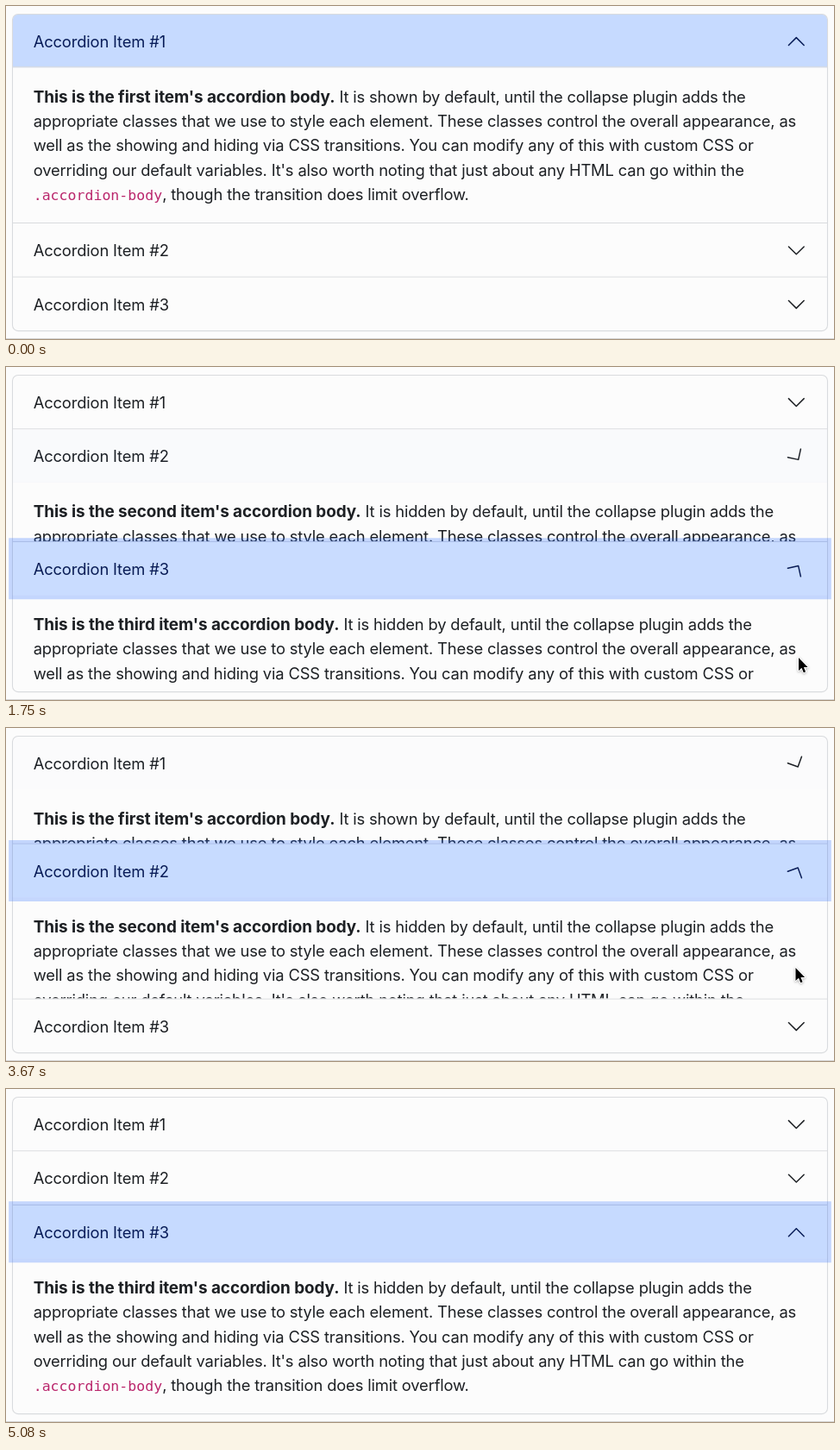
An HTML page with a canvas for the animation above (5330 ms loop, 960 by 386 pixels).

```html
<!DOCTYPE html>
<html lang="en">
<head>
<meta charset="utf-8">
<title>Accordion</title>
<style>
  html, body { margin: 0; width: 100%; height: 100%; overflow: hidden; background: #fcfcfc; }
  canvas { display: block; width: 960px; height: 386px; }
</style>
</head>
<body>
<canvas id="stage"></canvas>
<script>
const W = 960, H = 386, LOOP = 5330;
const canvas = document.getElementById('stage');
const ctx = canvas.getContext('2d');
const dpr = window.devicePixelRatio || 1;
canvas.width = W * dpr;
canvas.height = H * dpr;

// Layout
const LEFT = 7.9, RIGHT = 952.1, TOP = 9.8;
const BUTTON = 61.5, BORDER = 1.1, BODY = 179.7;
const PAD_X = 31.7, LINE = 28.4, BASE = 7.2, RING = 4.7, RADIUS = 5.9;

// Colours
const PAGE = [252, 252, 252], ACTIVE = [198, 218, 255];
const INK = [29, 32, 36], NAVY = [8, 28, 88];
const EDGE = '#d9dbde', CODE = '#ba266c', FOCUS = 'rgba(30,100,255,.25)';
const rgb = c => `rgb(${c.join(',')})`;
const mix = (a, b, k) => rgb(a.map((v, i) => v + (b[i] - v) * k));

// Type
const REGULAR = { font: '400 18.36px Inter, "Liberation Sans", sans-serif', gap: '-0.16px' };
const BOLD = { font: '700 18.93px Inter, "Liberation Sans", sans-serif', gap: '-0.08px' };
const MONO = { font: '16.56px "DejaVu Sans Mono", monospace', gap: '0px' };

const ITEMS = [['first', 'shown'], ['second', 'hidden'], ['third', 'hidden']];
const COPY = [
  'appropriate classes that we use to style each element. These classes control the overall appearance, as',
  'well as the showing and hiding via CSS transitions. You can modify any of this with custom CSS or',
  "overriding our default variables. It's also worth noting that just about any HTML can go within the"
];

// [time, item opened]
const CLICKS = [[-9999, 0], [710, 1], [1625, 2], [2640, 0], [3538, 1], [4313, 2]];
const SLIDE = 350, TURN = 200, FADE = 150, LEAD = 15;

// [time, x, y] of the pointer tip
const PATH = [
  [200, 931, 215], [520, 913, 280], [1100, 913, 280], [1300, 919, 337],
  [1800, 919, 337], [2330, 911, 45], [2500, 911, 38], [2690, 911, 38],
  [3000, 915.5, 163], [3250, 915.5, 278], [3800, 915.5, 278], [4200, 915, 354], [4520, 915, 354]
];

const ARROW = new Path2D('M0 0V15L3.5 11.8L5.8 17.2L8.1 16.2L5.9 10.9H10.6Z');
const HAND = new Path2D('M-2.2 12.5V2a2 2 0 0 1 4 0v6.2c0-2.2 3.6-2 3.6.3 .3-1.8 3.5-1.5 3.5.6 ' +
  '.4-1.5 2.8-1.1 2.8.9v4.5c0 1.6-1.3 2.6-1.3 4.5v2H-.6v-1.6c-1.6-2-3.6-4-5-6.6-1.6-2.4 1.2-3.8 2.5-1.9z');
const KNUCKLES = new Path2D('M2.6 13.2v4.3M5.3 13.2v4.3M8 13.2v4.3');
const CHEVRON = new Path2D('M-6-3L0 3L6-3');

function bezier(x1, y1, x2, y2) {
  const at = (a, b, u) => 3 * (1 - u) * (1 - u) * u * a + 3 * (1 - u) * u * u * b + u * u * u;
  return x => {
    if (x <= 0) return 0;
    if (x >= 1) return 1;
    let lo = 0, hi = 1;
    for (let i = 0; i < 24; i++) {
      const mid = (lo + hi) / 2;
      if (at(x1, x2, mid) < x) lo = mid; else hi = mid;
    }
    return at(y1, y2, lo);
  };
}
const ease = bezier(.25, .1, .25, 1);
const easeInOut = bezier(.42, 0, .58, 1);

function write(text, x, y, style, color) {
  ctx.font = style.font;
  ctx.letterSpacing = style.gap;
  ctx.fillStyle = color;
  ctx.fillText(text, x, y);
  return x + ctx.measureText(text).width;
}

function fillBox(y, h, r, color) {
  ctx.beginPath();
  ctx.roundRect(LEFT, y, RIGHT - LEFT, h, r);
  ctx.fillStyle = color;
  ctx.fill();
}

function drawBody(i, top, height) {
  if (height < .1) return;
  const ink = rgb(INK);
  const [name, state] = ITEMS[i];
  ctx.save();
  ctx.beginPath();
  ctx.rect(LEFT, top, RIGHT - LEFT, height);
  ctx.clip();
  let y = top + 18.93 + LINE / 2 + BASE;
  const x = write(`This is the ${name} item's accordion body.`, PAD_X, y, BOLD, ink);
  write(` It is ${state} by default, until the collapse plugin adds the`, x, y, REGULAR, ink);
  for (const line of COPY) write(line, PAD_X, y += LINE, REGULAR, ink);
  y += LINE;
  const end = write('.accordion-body', PAD_X, y, MONO, CODE);
  write(', though the transition does limit overflow.', end, y, REGULAR, ink);
  ctx.restore();
}

function drawChevron(y, turn, color) {
  ctx.save();
  ctx.translate(916.3, y);
  ctx.rotate(-Math.PI * turn);
  ctx.scale(1.48, 1.48);
  ctx.lineWidth = 1;
  ctx.lineCap = ctx.lineJoin = 'round';
  ctx.strokeStyle = color;
  ctx.stroke(CHEVRON);
  ctx.restore();
}

function drawRing(y, first) {
  const corners = r => first ? [r, r, 0, 0] : 0;
  ctx.beginPath();
  ctx.roundRect(LEFT - RING, y - RING, RIGHT - LEFT + 2 * RING, BUTTON + 2 * RING, corners(RADIUS + RING));
  ctx.roundRect(LEFT, y, RIGHT - LEFT, BUTTON, corners(RADIUS));
  ctx.fillStyle = FOCUS;
  ctx.fill('evenodd');
}

function pointerAt(t) {
  const k = PATH.findIndex(p => p[0] > t);
  if (k < 1) return null;
  const [t0, x0, y0] = PATH[k - 1], [t1, x1, y1] = PATH[k];
  const u = easeInOut((t - t0) / (t1 - t0));
  return [x0 + (x1 - x0) * u, y0 + (y1 - y0) * u];
}

function drawPointer(t, tops, settled) {
  const p = pointerAt(t);
  if (!p) return;
  const hand = settled && tops.some(y => p[1] > y && p[1] < y + BUTTON);
  ctx.save();
  ctx.translate(p[0], p[1]);
  ctx.lineJoin = 'round';
  if (hand) {
    ctx.fillStyle = '#fff';
    ctx.strokeStyle = '#111';
    ctx.lineWidth = 1.3;
    ctx.fill(HAND);
    ctx.stroke(HAND);
    ctx.lineWidth = 1.1;
    ctx.stroke(KNUCKLES);
  } else {
    ctx.shadowColor = 'rgba(0,0,0,.3)';
    ctx.shadowBlur = 3 * dpr;
    ctx.shadowOffsetY = dpr;
    ctx.strokeStyle = '#fff';
    ctx.lineWidth = 2;
    ctx.stroke(ARROW);
    ctx.shadowColor = 'transparent';
    ctx.fillStyle = '#000';
    ctx.fill(ARROW);
  }
  ctx.restore();
}

function draw(t) {
  const k = CLICKS.filter(c => c[0] <= t).length - 1;
  const [start, current] = CLICKS[k];
  const previous = k ? CLICKS[k - 1][1] : -1;
  const age = t - start;
  const level = (i, v) => i === current ? v : i === previous ? 1 - v : 0;
  const slide = ease(age / SLIDE);
  const turn = easeInOut((age + LEAD) / TURN);
  const fade = easeInOut(age / FADE);

  ctx.setTransform(dpr, 0, 0, dpr, 0, 0);
  ctx.fillStyle = rgb(PAGE);
  ctx.fillRect(0, 0, W, H);
  ctx.fillStyle = '#d6d6d6';
  ctx.fillRect(0, 385, W, 1);

  const tops = [];
  let y = TOP;
  for (let i = 0; i < 3; i++) {
    const lit = level(i, fade), open = level(i, slide) * BODY;
    const mid = y + BUTTON / 2, color = mix(INK, NAVY, lit);
    const bottom = y + BUTTON + open;
    tops.push(y);
    fillBox(y, BUTTON, i ? 0 : [RADIUS, RADIUS, 0, 0], mix(PAGE, ACTIVE, lit));
    if (lit > 0 && !(k && i === current)) {
      ctx.globalAlpha = lit;
      ctx.fillStyle = EDGE;
      ctx.fillRect(LEFT, y + BUTTON - BORDER, RIGHT - LEFT, BORDER);
      ctx.globalAlpha = 1;
    }
    write(`Accordion Item #${i + 1}`, PAD_X, mid + BASE, REGULAR, color);
    drawChevron(mid + .5, level(i, turn), color);
    drawBody(i, y + BUTTON, open);
    if (i < 2) {
      ctx.fillStyle = EDGE;
      ctx.fillRect(LEFT, bottom, RIGHT - LEFT, BORDER);
    }
    y = bottom + BORDER;
  }

  ctx.beginPath();
  ctx.roundRect(7.5, TOP - .3, 945, y - TOP - .4, 6.5);
  ctx.strokeStyle = EDGE;
  ctx.lineWidth = BORDER;
  ctx.stroke();

  if (k) drawRing(tops[current], current === 0);
  drawPointer(t, tops, age > SLIDE);
}

const origin = performance.now();
function tick() {
  draw((performance.now() - origin) % LOOP);
  requestAnimationFrame(tick);
}
tick();
</script>
</body>
</html>
```
